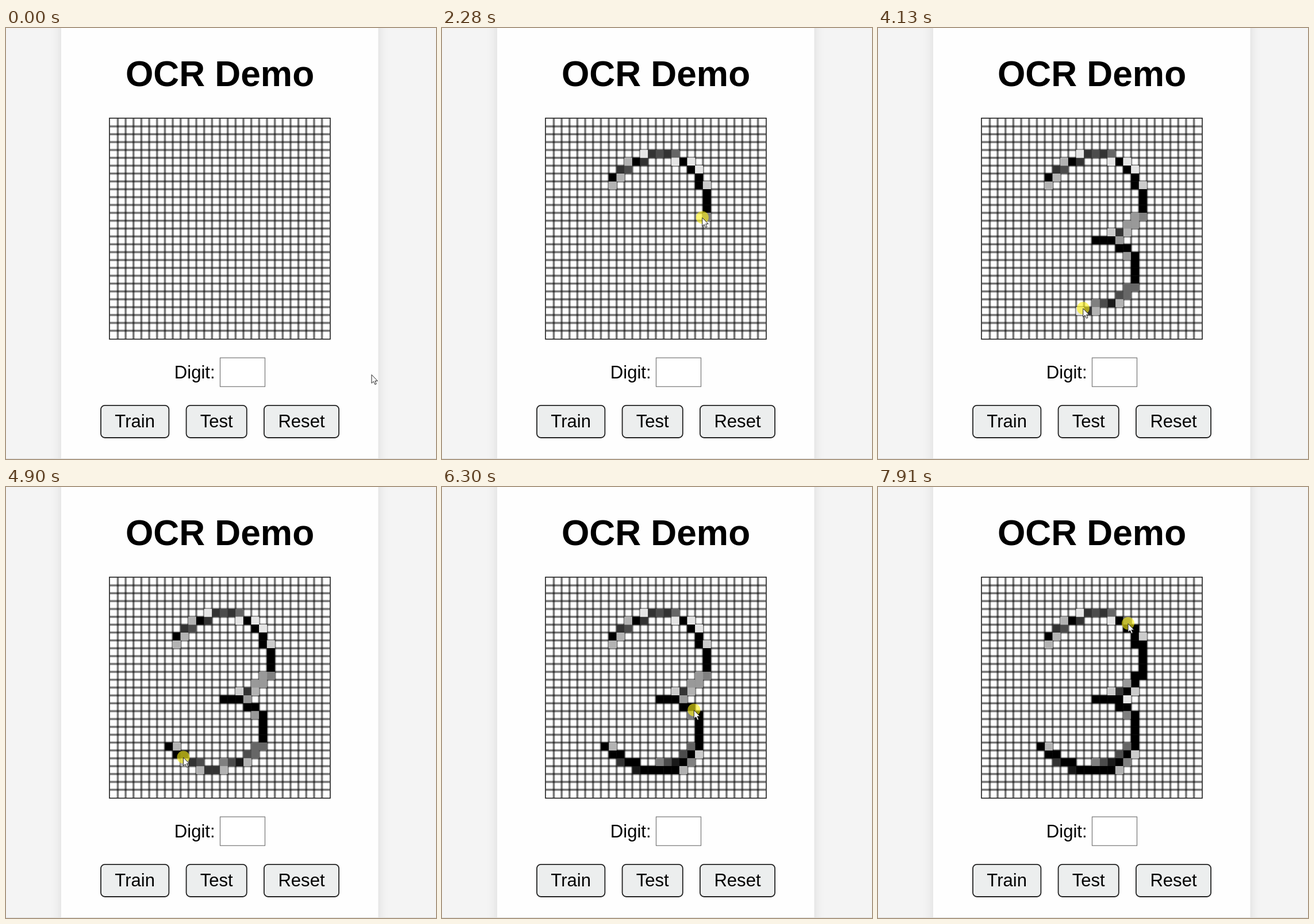
An HTML page that plays this animation: 748x749 px, repeating every 7990 ms.

```html
<!DOCTYPE html>
<html lang="en">
<head>
<meta charset="utf-8">
<title>OCR Demo</title>
<style>
  html, body { margin: 0; width: 100%; height: 100%; overflow: hidden; background: #f4f4f4; }
  svg { display: block; width: 748px; height: 749px; }
  text { font-family: "Liberation Sans", Arial, sans-serif; font-size: 31.1px; fill: #000; }
  .title { font-size: 62.2px; font-weight: bold; }
  .card { fill: #fefefe; filter: drop-shadow(0 0 9px rgba(0, 0, 0, .11)); }
  .btn { fill: #eceeee; stroke: #222; stroke-width: 1.8; }
  .mid { text-anchor: middle; }
</style>
</head>
<body>
<svg viewBox="0 0 748 749">
  <rect width="748" height="749" fill="#f4f4f4"/>
  <rect class="card" x="96" y="-30" width="551.5" height="800"/>
  <rect y="748" width="748" height="1" fill="#dcdcdc"/>
  <text class="mid title" x="372" y="101">OCR Demo</text>
  <rect x="180" y="156.7" width="384" height="384" fill="#fefefe"/>
  <g id="grid" fill="none" stroke="#000"></g>
  <g id="cells"></g>
  <rect x="180" y="156.7" width="384" height="384" fill="none" stroke="#1c1c1c" stroke-width="1.6"/>
  <text x="292.8" y="609">Digit:</text>
  <rect x="372.5" y="573.2" width="78" height="50" fill="#fff" stroke="#767676" stroke-width="1.2"/>
  <g id="buttons"></g>
  <circle id="spot" r="11" fill="rgb(255,244,20)" fill-opacity=".6"/>
  <path id="arrow" d="M0 0V14.8L3.4 11.7L5.9 17L8.2 16L5.9 10.8H10.4Z" fill="#fff" stroke="#222" stroke-linejoin="round"/>
</svg>
<script>
const LOOP = 7990, PRESS = 850;
const CELL = 13.66, LEFT = 180.8, TOP = 157.3, COUNT = 28;
const EVENT = 8, DOSE = .1;   // each move event while pressed adds a tenth of black
const $ = id => document.getElementById(id);

function add(parent, tag, attrs) {
  const el = document.createElementNS("http://www.w3.org/2000/svg", tag);
  for (const k in attrs) el.setAttribute(k, attrs[k]);
  parent.appendChild(el);
  return el;
}

// Pointer key points: time, x, y. A repeated place is a rest.
const approach = [[0, 636, 602], [700, 297, 268]];
const upper = [
  [870, 297, 268], [1000, 303, 256], [1220, 339, 232], [1380, 370, 223], [1520, 402, 221],
  [1600, 419, 232], [1800, 441, 253], [2000, 455, 281], [2200, 460, 315], [2280, 453, 329],
  [2430, 420, 358], [2670, 381, 369]
];
const lower = [
  [2820, 381, 369], [3000, 410, 373], [3160, 430, 384], [3300, 444, 398], [3500, 448, 425],
  [3660, 444, 446], [3900, 407, 477], [4130, 357, 487], [4300, 325, 479], [4520, 283, 451]
];
const back = [
  [4680, 283, 451], [4860, 303, 466], [5120, 341, 487], [5300, 375, 492], [5520, 413, 487],
  [5600, 421, 479], [5800, 440, 461], [6050, 447, 420], [6200, 444, 397], [6380, 432, 382],
  [6680, 399, 368]
];
const up = [
  [6780, 399, 368], [6920, 421, 365], [7000, 434, 358], [7300, 458, 318],
  [7610, 459, 276], [7800, 445, 250], [7910, 435, 237]
];
const keys = [...approach, ...upper, ...lower, ...back, ...up];

const same = (a, b) => a[1] === b[1] && a[2] === b[2];

// Speed at a key point; zero at ends and rests
function speed(i, axis) {
  const a = keys[i - 1], k = keys[i], b = keys[i + 1];
  if (!a || !b || same(a, k) || same(k, b)) return 0;
  return (b[axis] - a[axis]) / (b[0] - a[0]);
}

function pointer(t) {
  const j = keys.findIndex(k => k[0] > t);
  if (j < 0) return keys[keys.length - 1].slice(1);
  const i = j - 1, a = keys[i], b = keys[j];
  const span = b[0] - a[0], p = (t - a[0]) / span, q = 1 - p;
  return [1, 2].map(n =>
    q * q * (1 + 2 * p) * a[n] + p * p * (3 - 2 * p) * b[n] +
    span * p * q * (q * speed(i, n) - p * speed(j, n)));
}

// Replay the move events once; every cell keeps the times at which it gets ink
const cells = new Map();
function replay() {
  let last = pointer(PRESS);
  for (let t = PRESS; t < LOOP; t += EVENT) {
    const [x, y] = pointer(t);
    const moved = Math.hypot(x - last[0], y - last[1]) > .15;
    last = [x, y];
    if (!moved) continue;
    const col = Math.floor((x - LEFT) / CELL), row = Math.floor((y - TOP) / CELL);
    const id = col + "," + row;
    if (!cells.has(id)) {
      const el = add($("cells"), "rect", {
        x: LEFT + col * CELL - .2, y: TOP + row * CELL - .2, width: CELL + .3, height: CELL + .3
      });
      cells.set(id, { el, times: [] });
    }
    cells.get(id).times.push(t);
  }
}

function buildGrid() {
  let across = "", down = "";
  for (let i = 1; i < COUNT; i++) {
    across += `M180.6 ${TOP + i * CELL}H563.4`;
    down += `M${LEFT + i * CELL} 157.2V540.4`;
  }
  for (const d of [across, down])
    for (const [width, alpha] of [[5, .15], [3.4, .3], [1.6, .33]])
      add($("grid"), "path", { d, "stroke-width": width, "stroke-opacity": alpha });
}

function buildButtons() {
  for (const [label, x, width] of [["Train", 165, 118.4], ["Test", 313.6, 105.2], ["Reset", 448.9, 130.2]]) {
    add($("buttons"), "rect", { class: "btn", x, y: 655.8, width, height: 56.2, rx: 7 });
    add($("buttons"), "text", { class: "mid", x: x + width / 2, y: 694 }).textContent = label;
  }
}

function draw(t) {
  const [x, y] = pointer(t);
  $("arrow").setAttribute("transform", `translate(${x} ${y + .5})`);
  $("spot").setAttribute("cx", x);
  $("spot").setAttribute("cy", y);
  $("spot").setAttribute("visibility", t < PRESS ? "hidden" : "visible");
  for (const { el, times } of cells.values()) {
    const doses = times.filter(when => when <= t).length;
    const g = Math.round(255 * (1 - Math.min(1, doses * DOSE)));
    el.setAttribute("fill", `rgb(${g},${g},${g})`);
    el.setAttribute("visibility", doses ? "visible" : "hidden");
  }
}

buildGrid();
buildButtons();
replay();
const start = performance.now();
function tick() {
  draw((performance.now() - start) % LOOP);
  requestAnimationFrame(tick);
}
tick();
</script>
</body>
</html>
```
